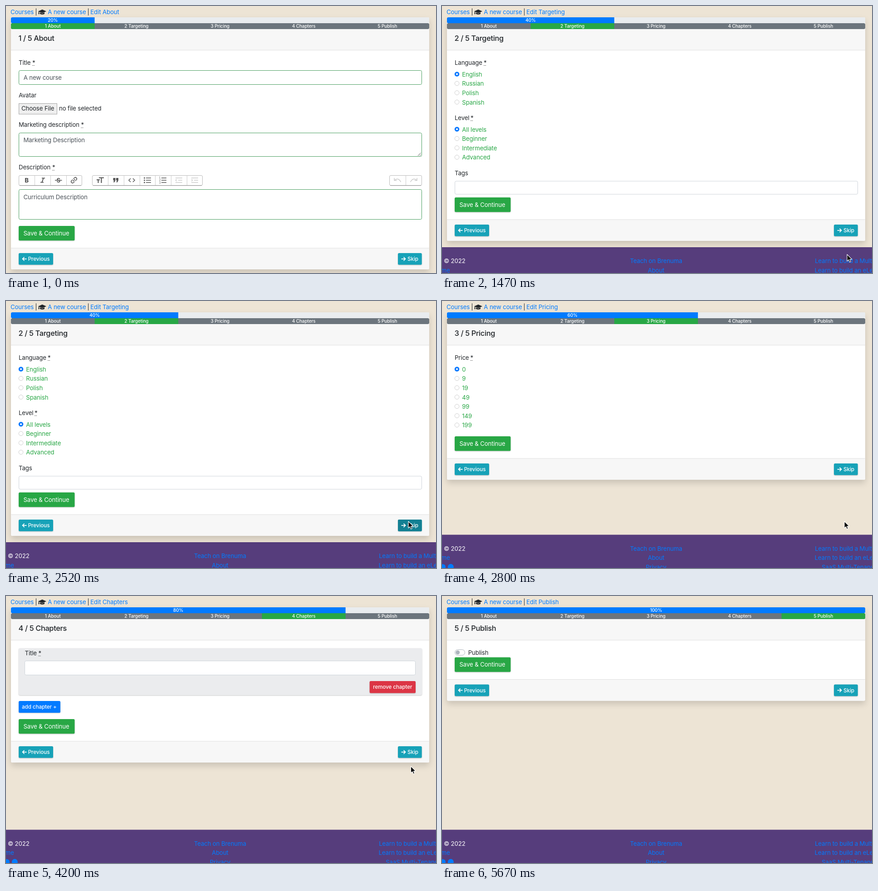
These frames come from a looping animation (949 px wide and 590 px high, 6090 ms). An HTML page:

```html
<!DOCTYPE html>
<html lang="en">
<head>
<meta charset="utf-8">
<title>Course wizard</title>
<style>
  html, body { margin: 0; width: 100%; height: 100%; overflow: hidden; background: #ede4d5; }
  svg { display: block; width: 949px; height: 590px; }
  text { font: 13.2px Inter, "Open Sans", sans-serif; letter-spacing: -.1px; fill: #212529; white-space: pre; }
  .link { fill: #007bff; }
  .ok { fill: #28a745; }
  .value { fill: #495057; }
  .white { fill: #fff; }
  .mid { text-anchor: middle; }
  .small { font-size: 11.7px; font-weight: 500; fill: #fff; }
  .tiny { font-size: 10px; font-weight: 500; fill: #fff; text-anchor: middle; }
  .head { font-size: 16.4px; font-weight: 500; letter-spacing: -.35px; }
  .card { filter: drop-shadow(0 7px 7px rgba(0, 0, 0, .15)); }
  .btn { filter: drop-shadow(0 1px 1px rgba(0, 0, 0, .22)); }
  .bar { clip-path: inset(0 round 3px); }
  .line { fill: none; stroke: #555; stroke-width: 1.5; }
  .off { stroke: #ccc; }
</style>
</head>
<body>
<svg viewBox="0 0 949 590">
  <g id="page"></g>
  <g id="cursor" stroke-linejoin="round">
    <path id="arrow" transform="scale(1.1)" fill="#000" stroke="#fff" d="M0 0V13.5L3.1 10.6 5.1 15.4 7.4 14.4 5.4 9.8H9.8Z"/>
    <g id="hand" stroke="#000">
      <path fill="#fff" stroke-width="1.1" d="M-1.6 1.2Q0-.9 1.4 1.2V5.4L7 6.8Q9 7.6 8.6 10.8L7.2 15.8H.2L-4.8 9.6Q-4.4 7.4-1.6 9.4Z"/>
      <path fill="none" stroke-width=".8" d="M1.4 5.4V8M4 6V8.4M6.4 6.7V9M1.6 11V14M3.7 11V14M5.8 11V14"/>
    </g>
  </g>
</svg>
<script>
const LOOP = 6090, STEP = 70;
const $ = id => document.getElementById(id);

const text = (s, x, y, cls = '') => `<text x="${x}" y="${y}" class="${cls}">${s}</text>`;
const rect = (x, y, w, h, fill, more = '') =>
  `<rect x="${x}" y="${y}" width="${w}" height="${h}" fill="${fill}" ${more}/>`;
const line = (d, cls = '', more = '') => `<path class="line ${cls}" d="${d}" ${more}/>`;
const dot = (x, y, r, fill, more = '') => `<circle cx="${x}" cy="${y}" r="${r}" fill="${fill}" ${more}/>`;

const required = (s, x, y, starX) => text(s, x, y) + text('*', starX, y) +
  line(`M${starX} ${y + 2}h5.5`, '', 'style="stroke:#333;stroke-width:1;stroke-dasharray:1 1"');
const input = (x, y, w, h, stroke = '#ced4da') =>
  rect(x + .5, y + .5, w - 1, h - 1, '#fff', `rx="3" stroke="${stroke}"`);
const button = (x, y, w, h, fill) => rect(x, y, w, h, fill, 'rx="2.5" class="btn"');

const radios = (y, labels) => labels.map((label, i) => {
  const cy = y + 20.6 * i;
  const mark = i ? dot(33, cy, 4.8, '#fff', 'stroke="#c8c8c8" stroke-width=".9"')
                 : dot(33, cy, 5.3, '#0a7aff') + dot(33, cy, 2, '#fff');
  return mark + text(label, 44.3, cy + 5.2, 'ok');
}).join('');

const toolGroup = (x, w, cuts) =>
  rect(x + .5, 374.5, w - 1, 22, '#fff', 'rx="2.5" stroke="#bbb"') +
  line(`M${x + 2} 396.7h${w - 4}`, '', 'style="stroke:#888;stroke-width:1"') +
  cuts.map(c => line(`M${c} 375v21`, '', 'style="stroke:#ccc;stroke-width:1"')).join('');

const rows = (x, cls) => line(`M${x} 380h11M${x} 385h11M${x} 390h11`, cls);
const outdent = (x, d) => line(`M${x} 380h15M${x + 6} 385h9M${x} 390h15`, 'off') +
  line(`M${x + 1.5 + d} 382.8l${-2 * d} 2.2 ${2 * d} 2.2`, 'off');
const curl = (x, d) => line(`M${x - 7 * d} 380v5.5h${5.5 * d}M${x - 6.5 * d} 385q${8 * d}-7 ${14 * d} 4`, 'off');

const toolbar = () =>
  toolGroup(28, 140, [63.5, 98.5, 133.5]) +
  toolGroup(190, 244, [225.5, 260.5, 295.5, 329.5, 364.5, 399.5]) +
  toolGroup(846, 72, [882.5]) +
  `<g style="font-weight:700">
    <text x="45.5" y="389.8" class="mid" style="font-weight:800;fill:#555">B</text>
    <text x="115.7" y="389.8" class="mid" style="font-weight:700;fill:#555">S</text>
  </g>` +
  line('M79 380.4h7M76 389.6h7M82.6 380.4l-3.2 9.2', '', 'style="stroke-width:1.9"') +
  line('M108 385.2h15.5') +
  line('M-1 3h-3.5a3 3 0 0 1 0-6h3.5M1-3h3.5a3 3 0 0 1 0 6h-3.5M-3 0h6', '',
    'transform="translate(150 385) rotate(-45)"') +
  line('M205 379.5h11M210.5 379.5v11.5M200 384h7M203.5 384v7', '', 'style="stroke-width:2.1"') +
  [236.5, 243].map(x => `<path fill="#555" d="M${x} 380h5v5l-2 4.5h-2.600l1.600-4h-2z"/>`).join('') +
  line('M275 381l-4 4 4 4M280 381l4 4-4 4') +
  rows(309) + [380, 385, 390].map(y => dot(305.5, y, 1.5, '#555')).join('') +
  rows(343) + [1, 2, 3].map(n =>
    `<text x="338" y="${377 + 5.2 * n}" style="font-size:5.5px;fill:#555">${n}</text>`).join('') +
  outdent(374, 1) + outdent(409, -1) + curl(864, 1) + curl(900, -1);

const GREEN = '#4a9e60';
const pages = [
  { name: 'About', start: 0, hover: 700, save: 486, foot: 596, body: () =>
    required('Title', 28, 129.5, 58) + input(28, 142, 890, 32, GREEN) + text('A new course', 38.7, 162.7, 'value') +
    text('Avatar', 28, 202) +
    rect(28.5, 215.5, 84, 23.500, '#efefef', 'stroke="#a3a3a3"') + text('Choose File', 34, 231) +
    text('no file selected', 117, 230.5) +
    required('Marketing description', 28, 267, 165.5) + input(28, 280, 890, 53, GREEN) +
    text('Marketing Description', 38.5, 300.5, 'value') +
    line('M909 331l6.500-6.500M913 331l2.500-2.500', '', 'style="stroke-width:1"') +
    required('Description', 28, 361, 102) + toolbar() + input(28, 405, 890, 67, GREEN) +
    text('Curriculum Description', 38.5, 426.5, 'value') },
  { name: 'Targeting', start: 1470, hover: 2170, save: 423, foot: 533, body: () =>
    required('Language', 28, 129.5, 92) + radios(150.500, ['English', 'Russian', 'Polish', 'Spanish']) +
    required('Level', 28, 251.5, 63) + radios(272.3, ['All levels', 'Beginner', 'Intermediate', 'Advanced']) +
    text('Tags', 28, 373.5) + input(28, 386.5, 890, 30) },
  { name: 'Pricing', start: 2800, hover: 3720, save: 299, foot: 516.5, body: () =>
    required('Price', 28, 129.5, 62.5) + radios(150.5, [0, 9, 19, 49, 99, 149, 199]) },
  { name: 'Chapters', start: 4130, hover: 4700, save: 272, foot: 516.5, body: () =>
    rect(28, 115.5, 890, 103.5, '#ebecee', 'rx="3" class="btn"') +
    required('Title', 41.5, 130.5, 71.5) + input(41, 143, 863, 32) +
    button(802.5, 188, 101.5, 26.5, '#dc3545') + text('remove chapter', 810, 205, 'small') +
    button(28, 232, 92, 26, '#007bff') + text('add chapter +', 35, 248.7, 'small') },
  { name: 'Publish', start: 5110, hover: Infinity, save: 135.5, foot: 516.5, body: () =>
    rect(28.5, 118.5, 22, 12.5, '#fff', 'rx="6.2" stroke="#adb5bd"') + dot(34.7, 124.7, 4.5, '#adb5bd') +
    text('Publish', 57.7, 129.5) },
];

function siteFooter(y) {
  return rect(0, y, 949, 590, '#563d7c') + text('© 2022', 4, y + 35, 'white') +
    text('me', -1.5, y + 55.5, 'link') + dot(2, y + 71, 6, '#007bff') + dot(19.3, y + 71, 6.5, '#007bff') +
    ['Teach on Brenuma', 'About', 'Privacy'].map((s, i) => text(s, 472.5, y + 35 + 20.5 * i, 'link mid')).join('') +
    text('Learn to build a Multi', 823, y + 35, 'link') + text('Learn to build an eLea', 822.5, y + 55.5, 'link') +
    text('SaaS Multi-Tenancy', 838, y + 76, 'link');
}

function draw(n) {
  const { name, save, foot, body } = pages[n], w = 184.6, y = save + 60, mid = y + 12.8;
  const arrowStyle = 'style="stroke:#fff;stroke-width:1.7"';
  return siteFooter(foot) +
    text('Courses', 10, 17.6, 'link') + text('|', 64.3, 17.6) +
    `<path fill="#212529" d="M71 11.700l9-4 9 4-9 4zM75 14.300v3.200q5 2.500 10 0v-3.200l-5 2.200zM71.900 12.500h1.200l.6 5.500h-2.200z"/>` +
    text('A new course', 92.3, 17.6, 'link') + text('|', 179.5, 17.6) + text('Edit ' + name, 186.3, 17.6, 'link') +
    rect(11, 25, 923, save + 71, '#fff', 'rx="3" class="card"') +
    rect(11, 51, 923, 46, '#f7f7f7') + rect(11, save + 49, 923, 47, '#f7f7f7', 'rx="3"') +
    line(`M11 97.500h923M11 ${save + 49}h923`, '', 'style="stroke:#dfdfdf;stroke-width:1"') +
    `<g class="bar">${rect(11, 25, 923, 13, '#e9ecef') + rect(11, 25, w * (n + 1), 13, '#007bff')}</g>` +
    `<g class="bar">${rect(11, 38, 923, 13, '#6c757d') + rect(11 + w * n, 38, w, 13, '#28a745')}</g>` +
    text((n + 1) * 20 + '%', 11 + w * (n + 1) / 2, 35, 'tiny') +
    pages.map((p, i) => text(`${i + 1} ${p.name}`, 11 + w * (i + .5), 48, 'tiny')).join('') +
    text(`${n + 1} / 5 ${name}`, 27.500, 76.5, 'head') + body() +
    button(28, save, 123.5, 32.3, '#28a745') + text('Save &amp; Continue', 38.5, save + 20.6, 'white') +
    button(28, y, 76, 25.8, '#17a2b8') + text('Previous', 48.7, y + 17, 'small') +
    line(`M45.500 ${mid}h-9M40.500 ${mid - 4}l-4 4 4 4`, '', arrowStyle) +
    button(865, y, 52.7, 25.8, '#17a2b8') + rect(865, y, 52.7, 25.8, '#138093', 'rx="2.5" id="hot"') +
    text('Skip', 886, y + 17, 'small') +
    line(`M872.500 ${mid}h9M877.500 ${mid - 4}l4 4-4 4`, '', arrowStyle);
}

// Pointer path: time, x, y
const path = [
  [490, 745, 528], [560, 757, 532], [770, 890, 552], [1120, 894, 549], [1750, 894, 549], [2380, 888, 487],
  [3150, 888, 487], [3430, 911, 440], [3780, 894, 381], [4060, 894, 381], [4690, 890, 344], [5320, 890, 344],
];

function pointer(t) {
  if (t > 5320) {
    const p = ((t - 5320) / 280) ** 1.5;
    return [890 - 352 * p, 344 + 232 * p];
  }
  const i = path.findIndex(k => k[0] >= t), [t0, x0, y0] = path[i - 1], [t1, x1, y1] = path[i];
  const u = (t - t0) / (t1 - t0), e = u * u * (3 - 2 * u);
  return [x0 + (x1 - x0) * e, y0 + (y1 - y0) * e];
}

let shown = -1;
function frame(now) {
  const t = Math.floor(now % LOOP / STEP) * STEP;
  const n = pages.findLastIndex(p => t >= p.start);
  if (n !== shown) $('page').innerHTML = draw(shown = n);
  $('hot').setAttribute('opacity', Math.max(0, Math.min(1, (t - pages[n].hover) / 150)));

  const visible = t >= 560 && t < 5670, hand = t >= 700 && t < 1470;
  $('cursor').style.display = visible ? '' : 'none';
  if (visible) $('cursor').setAttribute('transform', `translate(${pointer(t)})`);
  $('arrow').style.display = hand ? 'none' : '';
  $('hand').style.display = hand ? '' : 'none';
  requestAnimationFrame(frame);
}
requestAnimationFrame(frame);
</script>
</body>
</html>
```
